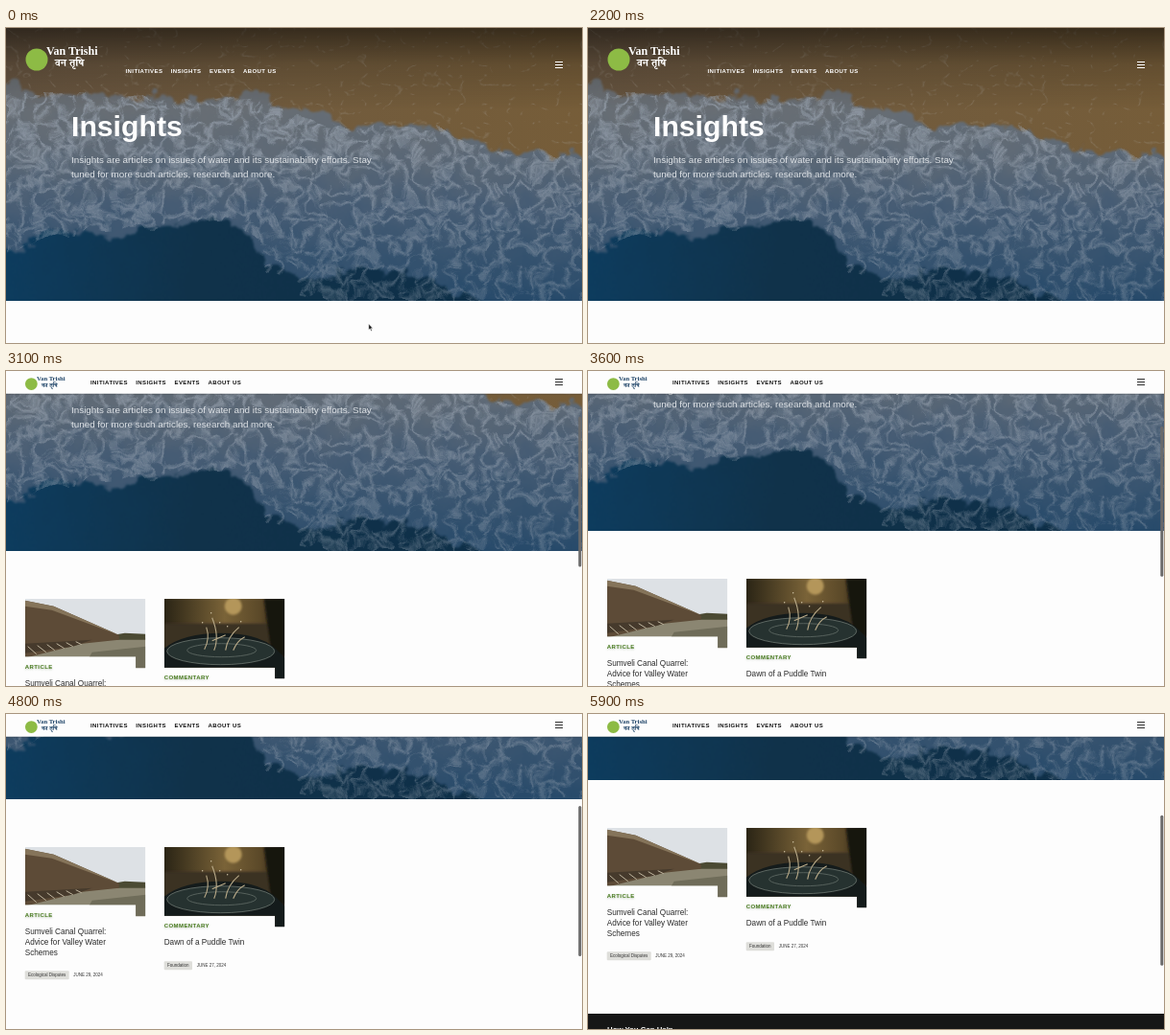
Animation of 600 by 329 pixels, one loop 6 s. Source, as an HTML page:

```html
<!DOCTYPE html>
<html lang="en">
<head>
<meta charset="utf-8">
<title>Insights</title>
<style>
  html, body { margin: 0; width: 100%; height: 100%; overflow: hidden; background: #fdfdfd; }
  #stage { position: relative; width: 100%; height: 100%; overflow: hidden; contain: strict; }
  svg { position: absolute; left: 0; top: 0; display: block; }
  #page { position: absolute; left: 0; top: 0; will-change: transform; }
  text { font-family: "Liberation Sans", Arial, sans-serif; white-space: pre; }
  .caps { font-size: 6px; font-weight: 700; letter-spacing: .42px; }
  .label { fill: #4b7d22; text-shadow: 0 1px 2px rgba(60, 90, 40, .35); }
  .lead { font-size: 9.85px; fill: #dfe3e7; }
  .title { font-size: 8.2px; fill: #2a2a2a; }
  .small { font-size: 4.5px; fill: #333; }
  .pill { fill: #dededa; }
  .brand { font: 700 12px "Liberation Serif", "Times New Roman", serif; }
  .brand-hi { font: 700 11px "Noto Serif Devanagari", "Noto Sans Devanagari", "Noto Sans", sans-serif; }
  #bar { fill: #fff; color: #fff; }
  #bar.stuck { fill: #111; color: #333; }
  #bar .name { fill: #fff; }
  #bar.stuck .name { fill: #1f4468; }
  #bar .shade, #bar.stuck .strip { display: inline; }
  #bar .strip, #bar.stuck .shade { display: none; }
</style>
</head>
<body>
<div id="stage">
<div id="page">
<svg width="600" height="620" viewBox="0 0 600 620">
  <defs>
    <linearGradient id="sand" x1="0" y1="0" x2="1" y2="0">
      <stop offset="0" stop-color="#665440"/>
      <stop offset=".5" stop-color="#715b3d"/>
      <stop offset="1" stop-color="#765d39"/>
    </linearGradient>
    <linearGradient id="sea" x1="0" y1="0" x2="0" y2="1">
      <stop offset="0" stop-color="#6b6f73"/>
      <stop offset=".25" stop-color="#5f6a76"/>
      <stop offset=".5" stop-color="#465c74"/>
      <stop offset="1" stop-color="#204668"/>
    </linearGradient>
    <linearGradient id="deep" x1="0" y1="0" x2="1" y2="0">
      <stop offset="0" stop-color="#0d3d60"/>
      <stop offset=".4" stop-color="#10324a"/>
      <stop offset="1" stop-color="#0e2f48"/>
    </linearGradient>
    <linearGradient id="fade" x1="0" y1="0" x2="0" y2="1">
      <stop offset="0" stop-color="#fff"/>
      <stop offset=".4" stop-color="#ccc"/>
      <stop offset="1" stop-color="#777"/>
    </linearGradient>
    <linearGradient id="bokeh" x1="0" y1="0" x2="1" y2="0">
      <stop offset="0" stop-color="#2a2415"/>
      <stop offset=".5" stop-color="#7a6338"/>
      <stop offset=".8" stop-color="#5a4828"/>
      <stop offset="1" stop-color="#1f1a12"/>
    </linearGradient>
    <mask id="thin"><rect width="600" height="240" y="45" fill="url(#fade)"/></mask>
    <filter id="rough" x="-5%" y="-10%" width="110%" height="120%" color-interpolation-filters="sRGB">
      <feTurbulence type="fractalNoise" baseFrequency=".04" numOctaves="4" seed="4"/>
      <feDisplacementMap in="SourceGraphic" scale="32" xChannelSelector="R" yChannelSelector="G"/>
      <feGaussianBlur stdDeviation="1.2"/>
    </filter>
    <filter id="foam" x="0" y="0" width="100%" height="100%" color-interpolation-filters="sRGB">
      <feTurbulence type="fractalNoise" baseFrequency=".05" numOctaves="2" seed="3" result="swirl"/>
      <feTurbulence type="turbulence" baseFrequency=".06" numOctaves="4" seed="11"/>
      <feColorMatrix values="0 0 0 0 .62  0 0 0 0 .66  0 0 0 0 .71  0 0 0 -3 1.2"/>
      <feDisplacementMap in2="swirl" scale="24" xChannelSelector="R" yChannelSelector="G" result="web"/>
      <feDisplacementMap in="SourceGraphic" in2="swirl" scale="24" xChannelSelector="G" yChannelSelector="R" result="area"/>
      <feComposite in="web" in2="area" operator="in"/>
    </filter>
    <filter id="lace" x="0" y="0" width="100%" height="100%" color-interpolation-filters="sRGB">
      <feTurbulence type="turbulence" baseFrequency=".04 .05" numOctaves="3" seed="7"/>
      <feColorMatrix values="0 0 0 0 .6  0 0 0 0 .56  0 0 0 0 .5  0 0 0 -7 .95"/>
      <feComposite operator="in" in2="SourceAlpha"/>
    </filter>
    <filter id="soft"><feGaussianBlur stdDeviation="1.2"/></filter>
    <clipPath id="heroBox"><rect width="600" height="285"/></clipPath>
    <clipPath id="shot1"><path d="M0 0H125.500V72.500H115.500V60.500H0Z"/></clipPath>
    <clipPath id="shot2"><path d="M0 0H125.500V83.500H115.500V72H0Z"/></clipPath>
  </defs>

  <g clip-path="url(#heroBox)">
    <rect width="600" height="285" fill="url(#sand)"/>
    <rect width="600" height="140" filter="url(#lace)" opacity=".4"/>
    <path filter="url(#rough)" fill="url(#sea)" d="M-20 66L50 65 100 72 200 76 255 67 310 88 360 104 440 101 480 118 520 128 620 133V310H-20Z"/>
    <path filter="url(#rough)" fill="url(#deep)" d="M-20 238L50 216 120 214 180 205 230 202 258 216 270 247 310 259 360 248 420 258 480 279 520 310H-20Z"/>
    <g mask="url(#thin)">
      <path filter="url(#foam)" opacity=".7" d="M0 68L50 67 100 74 200 78 255 69 310 90 360 106 440 103 480 120 520 130 600 135V285H330L270 250 260 215 230 200 180 205 50 215 0 235Z"/>
    </g>
  </g>
  <text x="68" y="113" font-size="30.200" font-weight="700" fill="#fff">Insights</text>
  <text class="lead" x="68" y="141">Insights are articles on issues of water and its sustainability efforts. Stay</text>
  <text class="lead" x="68" y="156">tuned for more such articles, research and more.</text>

  <g transform="translate(19.700 334.700)">
    <g clip-path="url(#shot1)">
      <rect width="126" height="73" fill="#dde1e5"/>
      <rect y="41" width="126" height="32" fill="#8b8672"/>
      <path fill="#4b4a33" d="M92 38L104 36 126 37V43H92Z"/>
      <path fill="#5d4b37" d="M0 2L30 8 98 38V43L60 47 0 62Z"/>
      <path fill="#85745a" d="M0 2L30 8 98 38 28 12 0 8Z"/>
      <path fill="#463a2c" d="M0 47L70 43 50 50 0 57Z"/>
      <path fill="none" stroke="#c0b69f" d="M3 50l9 8M13 49l9 7M23 48l8 6M33 47l8 5M43 46l7 4M53 45l6 3"/>
      <path fill="#6f6c59" d="M70 56L126 50V73H60Z"/>
    </g>
    <text class="caps label" y="73.700">ARTICLE</text>
    <text class="title" y="91.500">Sumveli Canal Quarrel:</text>
    <text class="title" y="102.200">Advice for Valley Water</text>
    <text class="title" y="112.900">Schemes</text>
    <rect class="pill" y="129.500" width="46" height="9" rx="1"/>
    <text class="small" x="3.300" y="135.600">Ecological Disputes</text>
    <text class="small" x="50.500" y="135.600">JUNE 29, 2024</text>
  </g>

  <g transform="translate(164.700 334.700)">
    <g clip-path="url(#shot2)">
      <rect width="126" height="84" fill="url(#bokeh)"/>
      <g filter="url(#soft)">
        <circle cx="72" cy="8" r="9" fill="#b4965a"/>
        <path fill="#3a3320" d="M0 26H126V60H0Z"/>
        <path fill="#15130f" d="M104 0H126V60H112Z"/>
      </g>
      <path fill="#141b1b" d="M0 84V52Q20 36 60 36T118 54L126 62V84Z"/>
      <ellipse cx="59" cy="55" rx="56" ry="14" fill="#263230" stroke="#6d7670" stroke-width=".8"/>
      <ellipse cx="60" cy="54" rx="36" ry="7" fill="none" stroke="#56615c"/>
      <path fill="none" stroke="#b9aa88" stroke-width="1.100" d="M42 53Q48 42 44 30M52 54Q58 40 50 20M64 54Q66 40 78 30M72 54Q76 44 84 40M50 44L64 38"/>
      <path stroke="#d3c7a8" stroke-width="1.400" stroke-linecap="round" d="M49 15v.1M58 25v.1M80 24v.1M66 29v.1M40 25v.1"/>
    </g>
    <text class="caps label" y="84.700">COMMENTARY</text>
    <text class="title" y="102.600">Dawn of a Puddle Twin</text>
    <rect class="pill" y="119.500" width="29.300" height="9" rx="1"/>
    <text class="small" x="3.300" y="125.600">Foundation</text>
    <text class="small" x="34" y="125.600">JUNE 27, 2024</text>
  </g>

  <rect y="529" width="600" height="91" fill="#161616"/>
  <text x="20" y="548.200" font-size="7.800" font-weight="700" fill="#fff">How You Can Help</text>
</svg>
</div>

<svg id="bar" width="600" height="329" viewBox="0 0 600 329">
  <defs>
    <linearGradient id="dusk" x1="0" y1="0" x2="0" y2="1">
      <stop offset="0" stop-opacity=".52"/>
      <stop offset=".45" stop-opacity=".16"/>
      <stop offset="1" stop-opacity="0"/>
    </linearGradient>
  </defs>
  <rect class="shade" width="600" height="85" fill="url(#dusk)"/>
  <g class="strip">
    <rect width="600" height="25" fill="#000" opacity=".15"/>
    <rect width="600" height="23.700" fill="#fdfdfd"/>
  </g>
  <g id="logo">
    <circle cx="32" cy="33" r="11.500" fill="#8dbb45"/>
    <text class="brand name" x="42" y="27.500">Van Trishi</text>
    <text class="brand-hi name" x="51" y="40">वन तृषि</text>
  </g>
  <g id="nav" class="caps">
    <text x="124.500" y="47.200">INITIATIVES</text>
    <text x="171.700" y="47.200">INSIGHTS</text>
    <text x="212" y="47.200">EVENTS</text>
    <text x="247" y="47.200">ABOUT US</text>
  </g>
  <path id="menu" stroke="currentColor" stroke-width="1" d="M572 35.500h8M572 38.500h8M572 41.500h8"/>
  <rect id="thumb" x="596.300" width="3" height="157" rx="1.500" fill="#6a6a6a"/>
  <path id="cursor" fill="#111" stroke="#fff" stroke-width=".5" d="M377.800 309v6.300l1.400-1.200 1.100 2.400 1-.5-1.100-2.300h1.900Z"/>
</svg>
</div>

<script>
const LOOP = 6000, TICK = 100, STICK_AT = 2300, CURSOR_GONE = 2000;

// time in ms, scroll offset in px
const scrollKeys = [
  [0, 0], [2200, 0], [2300, 3], [2500, 11], [2700, 20], [2800, 37], [2900, 60],
  [3000, 82], [3100, 97], [3200, 105], [3300, 111], [3400, 115], [3600, 118],
  [3700, 118], [3800, 119], [3900, 127], [4000, 145], [4100, 168], [4200, 185],
  [4300, 193], [4400, 196], [5200, 196], [5300, 198], [5400, 202], [5500, 207],
  [5600, 211], [5700, 214], [5800, 215.5], [5900, 216]
];

const $ = id => document.getElementById(id);
const [page, bar, logo, nav, menu, thumb, cursor] =
  ["page", "bar", "logo", "nav", "menu", "thumb", "cursor"].map($);

function scrollAt(t) {
  const i = scrollKeys.findIndex(key => key[0] > t);
  if (i < 0) return scrollKeys[scrollKeys.length - 1][1];
  const [t0, y0] = scrollKeys[i - 1], [t1, y1] = scrollKeys[i];
  return y0 + (y1 - y0) * (t - t0) / (t1 - t0);
}

function place(el, stuck, transform) {
  el.setAttribute("transform", stuck ? transform : "");
}

function draw(t) {
  const y = scrollAt(t), stuck = t >= STICK_AT;
  page.style.transform = `translateY(${-y}px)`;
  bar.classList.toggle("stuck", stuck);
  place(logo, stuck, "translate(8.6 -4.8) scale(.555)");
  place(nav, stuck, "translate(-36.5 -33.4)");
  place(menu, stuck, "translate(0 -27)");
  thumb.setAttribute("y", y * .49);
  thumb.style.visibility = stuck ? "visible" : "hidden";
  cursor.style.visibility = t < CURSOR_GONE ? "visible" : "hidden";
}

const start = performance.now();
let last = -1;
function frame() {
  const t = Math.floor((performance.now() - start) % LOOP / TICK) * TICK;
  if (t !== last) draw(last = t);
  requestAnimationFrame(frame);
}
frame();
</script>
</body>
</html>
```
